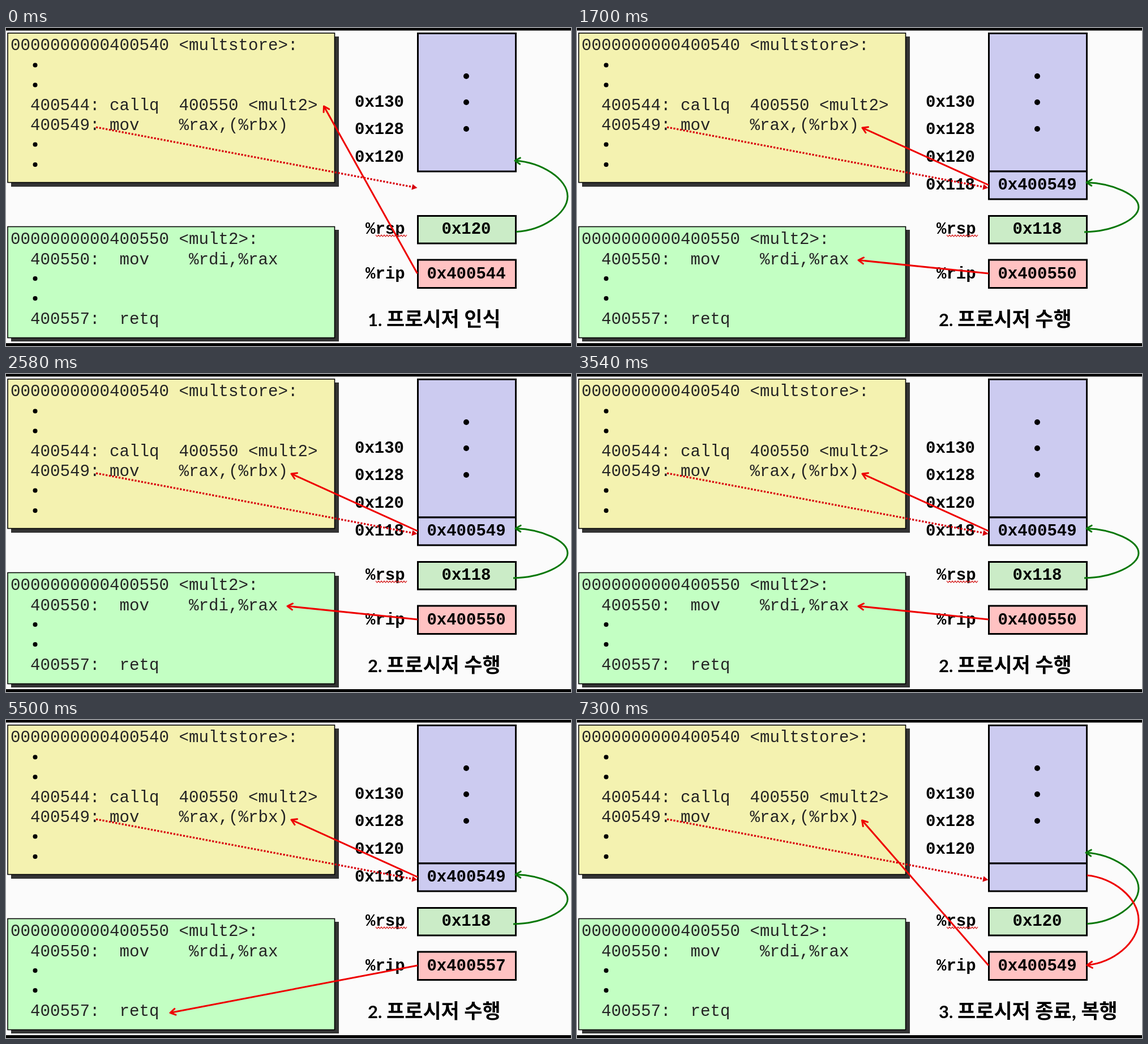
Animation of 998 by 561 pixels, one loop 7340 ms. Source, as an HTML page:

```html
<!DOCTYPE html>
<html lang="ko">
<head>
<meta charset="utf-8">
<title>Procedure call and return</title>
<style>
  html, body { margin: 0; width: 100%; height: 100%; overflow: hidden; background: #fbfbfb; }
  svg { display: block; width: 998px; height: 561px; }
  text { white-space: pre; fill: #000; }
  .code { font: 29.17px "Liberation Mono", monospace; fill: #242424; }
  .bold { font: bold 29px "Liberation Mono", monospace; }
  .value { text-anchor: middle; }
  .num { font: bold 31px Lato, sans-serif; }
  .title { font: bold 35px Lato, "Noto Sans CJK KR", "Noto Sans CJK", "Noto Sans CJK JP", sans-serif; }
  .panel { stroke: #000; stroke-width: 1.6; }
  .shadow { fill: #333; }
  .cell { stroke: #000; stroke-width: 3; }
  .stack { fill: #cccbf0; }
  .line { fill: none; stroke-width: 3; }
  .red { stroke: #ee0000; marker-end: url(#redHead); }
  .green { stroke: #0a780a; marker-end: url(#greenHead); }
  .dotted { stroke: #d8000c; stroke-width: 3.3; stroke-dasharray: 3.2 2.6; }
  marker path { fill: none; stroke-width: 3; stroke-linecap: round; stroke-linejoin: round; }
</style>
</head>
<body>
<svg viewBox="0 0 998 561">
  <defs>
    <marker id="redHead" markerUnits="userSpaceOnUse" markerWidth="30" markerHeight="30" orient="auto" overflow="visible">
      <path d="M-9-5.5L0 0L-9 5.5" stroke="#ee0000"/>
    </marker>
    <marker id="greenHead" markerUnits="userSpaceOnUse" markerWidth="30" markerHeight="30" orient="auto" overflow="visible">
      <path d="M-9-5.5L0 0L-9 5.5" stroke="#0a780a"/>
    </marker>
  </defs>
  <rect width="998" height="561" fill="#fbfbfb"/>
  <path d="M0 0H998V4.5H0ZM0 556H998V561H0Z"/>

  <!-- Code panels -->
  <rect class="shadow" x="9" y="15" width="579" height="265"/>
  <rect class="panel" x="3" y="9" width="577.5" height="263.5" fill="#f4f2b0"/>
  <rect class="shadow" x="9" y="356" width="579" height="197"/>
  <rect class="panel" x="3" y="350.5" width="577.5" height="196" fill="#c3ffc3"/>
  <text class="code" x="8" y="39">0000000000400540 &lt;multstore&gt;:</text>
  <text class="code" x="8" y="145">  400544: callq  400550 &lt;mult2&gt;</text>
  <text class="code" x="8" y="180">  400549: mov    %rax,(%rbx)</text>
  <text class="code" x="8" y="381">0000000000400550 &lt;mult2&gt;:</text>
  <text class="code" x="8" y="417">  400550:  mov    %rdi,%rax</text>
  <text class="code" x="8" y="522">  400557:  retq</text>

  <!-- Stack and registers -->
  <rect class="cell stack" x="727.5" y="9.5" width="173" height="243.5"/>
  <rect class="cell stack" data-on="123" x="727.5" y="253" width="173" height="49"/>
  <rect class="cell" x="727.5" y="331.5" width="173" height="48.5" fill="#cbecc7"/>
  <rect class="cell" x="727.5" y="409" width="173" height="49.5" fill="#ffc2c2"/>
  <g id="dots"></g>
  <text class="bold" x="616" y="139">0x130</text>
  <text class="bold" x="616" y="187">0x128</text>
  <text class="bold" x="616" y="236">0x120</text>
  <text class="bold" x="616" y="285" data-on="12">0x118</text>
  <text class="bold" x="635" y="363">%rsp</text>
  <text class="bold" x="635" y="442">%rip</text>
  <path id="squiggle" fill="none" stroke="#d83030" stroke-width="1.2"/>

  <text class="bold value" x="813" y="285" data-on="12">0x400549</text>
  <text class="bold value" x="813" y="363" data-on="03">0x120</text>
  <text class="bold value" x="813" y="363" data-on="12">0x118</text>
  <text class="bold value" x="813" y="442" data-on="0">0x400544</text>
  <text class="bold value" x="813" y="442" data-on="1">0x400550</text>
  <text class="bold value" x="813" y="442" data-on="2">0x400557</text>
  <text class="bold value" x="813" y="442" data-on="3">0x400549</text>

  <!-- Arrows -->
  <path class="line dotted" d="M159 175L718 280.4"/>
  <path d="M726.5 282L716.3 285.4L718.3 275.6Z" fill="#d8000c"/>
  <path class="line green" data-on="03" d="M901 359.5C946 357 992 328 992 297C992 266 946 237 899 234"/>
  <path class="line green" data-on="12" d="M896 360C946 359 992 338 992 316C992 294 946 274 900 272.5"/>
  <path class="line red" data-on="0" d="M726.5 433L561.5 138"/>
  <path class="line red" data-on="12" d="M727 277L504 176"/>
  <path class="line red" data-on="1" d="M727 433L497 409.5"/>
  <path class="line red" data-on="2" d="M727 433L290 516.5"/>
  <path class="line red" data-on="3" d="M727 433L503.5 177"/>
  <path class="line red" data-on="3" d="M901 274C946 278 992 313 992 353C992 393 946 429 901 432.5"/>

  <!-- Captions -->
  <g data-on="0"><text class="num" x="639" y="526">1.</text><text class="title" x="672" y="526">프로시저 인식</text></g>
  <g data-on="12"><text class="num" x="639" y="526">2.</text><text class="title" x="672" y="526">프로시저 수행</text></g>
  <g data-on="3"><text class="num" x="639" y="526">3.</text><text class="title" x="672" y="526">프로시저 종료, 복행</text></g>
</svg>
<script>
  const LOOP = 7340;
  const STARTS = [0, 1340, 3980, 5780];

  const dot = (x, r) => y => `<circle cx="${x}" cy="${y}" r="${r}"/>`;
  document.getElementById('dots').innerHTML =
    [65.5, 100.5, 205.5, 241, 442, 477].map(dot(51.5, 4)).join('') +
    [85, 131, 178].map(dot(813, 5)).join('');
  document.getElementById('squiggle').setAttribute('d', 'M653 365' + 'l2.5 3l2.5-3'.repeat(11));

  const parts = document.querySelectorAll('[data-on]');
  const begin = performance.now();
  let shown = -1;

  function draw() {
    const time = (performance.now() - begin) % LOOP;
    const stage = STARTS.filter(start => start <= time).length - 1;
    if (stage !== shown) {
      shown = stage;
      for (const part of parts) part.style.display = part.dataset.on.includes(stage) ? '' : 'none';
    }
    requestAnimationFrame(draw);
  }
  draw();
</script>
</body>
</html>
```
